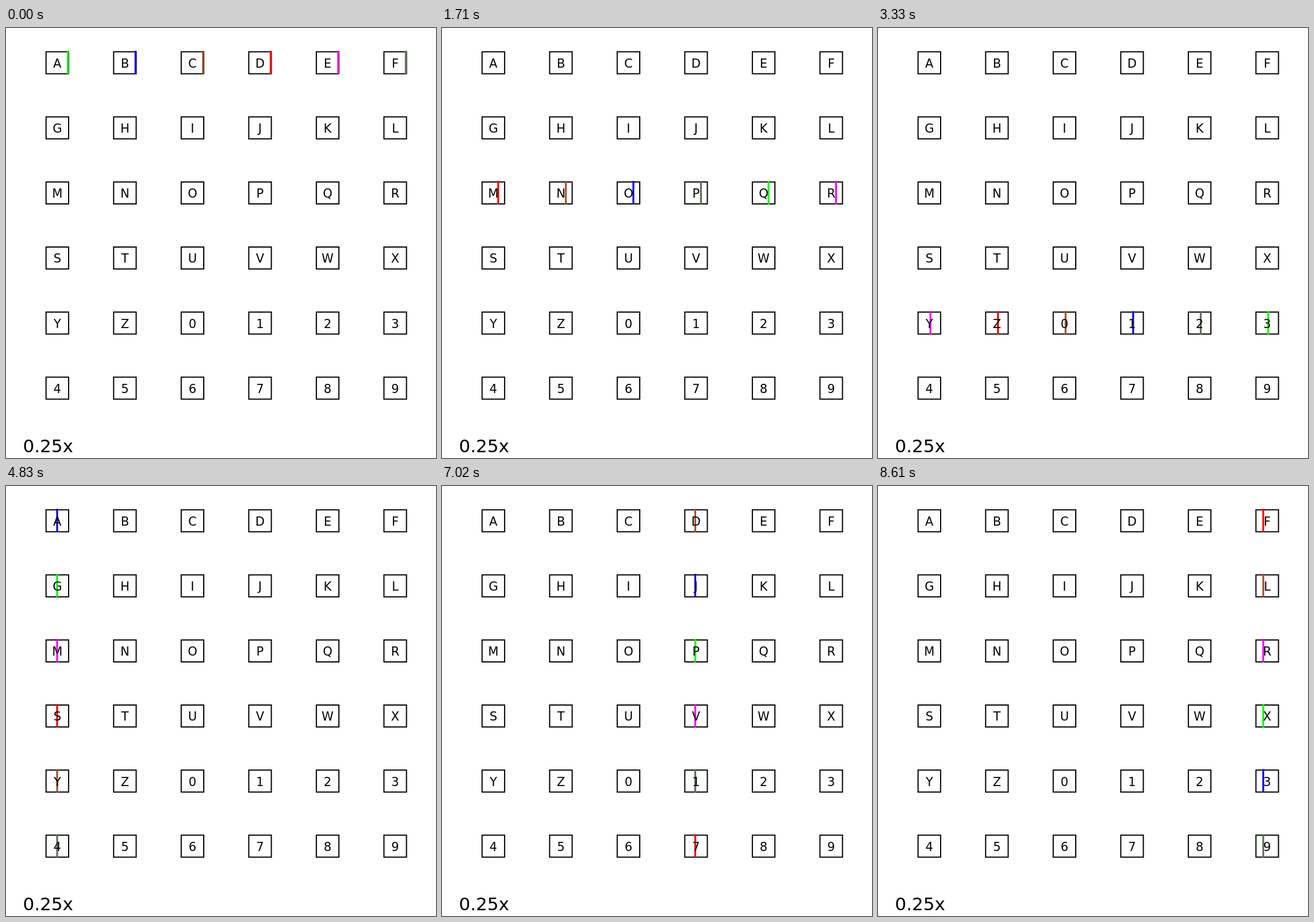
Animation, 748 px wide and 748 px high, one loop 8.64 s. Source, as an HTML page:

```html
<!DOCTYPE html>
<html lang="en">
<head>
<meta charset="utf-8">
<title>Moving bar speller</title>
<style>
html, body { margin: 0; width: 100%; height: 100%; overflow: hidden; background: #fff; }
svg { display: block; width: 748px; height: 748px; }
text { font-family: "DejaVu Sans", sans-serif; font-size: 21px; text-anchor: middle; }
.cell { fill: none; stroke: #000; stroke-width: 2; }
.speed { font-size: 31px; text-anchor: start; }
</style>
</head>
<body>
<svg viewBox="0 0 748 748">
  <g id="boxes"></g>
  <g id="bars"></g>
  <g id="letters"></g>
  <text class="speed" x="29.5" y="738.3">0.25x</text>
</svg>
<script>
const SIZE = 6, STEP = 30, STEPS_PER_GROUP = 24, GROUPS = 12;
const CHARS = "ABCDEFGHIJKLMNOPQRSTUVWXYZ0123456789";
const COLORS = {
  g: "#00ff00", b: "#0000e8", n: "#a0522d",
  r: "#f80000", m: "#f800f8", s: "#5f6f5c"
};
// Bar colours along each row, then down each column
const ORDERS = [
  "gbnrms", "gsrmbn", "rnbsgm", "mrsgnb", "mrnbsg", "bgmnsr",
  "bgmrns", "sbrgmn", "nmgsrb", "nbgmsr", "gsbnrm", "rnmgbs"
];

const colX = c => 89.3 + 117.55 * c;
const rowY = r => 60.5 + 113.2 * r;

function add(parent, tag, attrs, text = "") {
  const el = document.createElementNS("http://www.w3.org/2000/svg", tag);
  for (const name in attrs) el.setAttribute(name, attrs[name]);
  el.textContent = text;
  return document.getElementById(parent).appendChild(el);
}

[...CHARS].forEach((char, i) => {
  const x = colX(i % SIZE), y = rowY(Math.floor(i / SIZE));
  add("boxes", "rect", { class: "cell", x: x - 19.6, y: y - 19.1, width: 39.2, height: 38.2 });
  add("letters", "text", { x, y: y + 8.3 }, char);
});

const bars = Array.from({ length: SIZE }, () => add("bars", "rect", { width: 3.2, height: 40.4 }));

function draw(now) {
  const step = Math.floor(now / STEP) % (STEPS_PER_GROUP * GROUPS);
  const group = Math.floor(step / STEPS_PER_GROUP);
  const offset = 18.4 - 1.1 * (step % STEPS_PER_GROUP);
  bars.forEach((bar, i) => {
    const [col, row] = group < SIZE ? [i, group] : [group - SIZE, i];
    bar.setAttribute("x", colX(col) + offset - 1.6);
    bar.setAttribute("y", rowY(row) - 20.8);
    bar.setAttribute("fill", COLORS[ORDERS[group][i]]);
  });
}

const start = performance.now();
function tick() {
  draw(performance.now() - start);
  requestAnimationFrame(tick);
}
tick();
</script>
</body>
</html>
```
